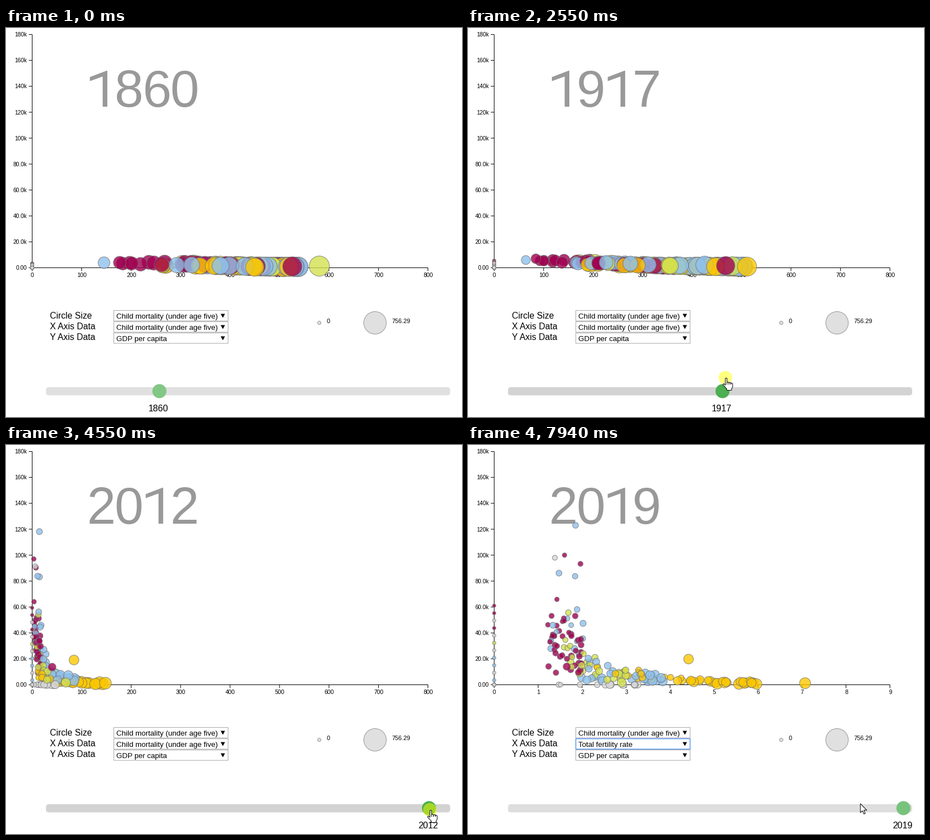
A matplotlib script that plays this animation: 810x692 px, repeating every 8 s.

```python
import numpy as np
import matplotlib.pyplot as plt
from matplotlib.animation import FuncAnimation
from matplotlib.colors import to_rgb, to_rgba
from matplotlib.patches import Circle, FancyBboxPatch, Polygon, Rectangle

W, H, DPI = 810, 692, 100
PT = 72 / DPI
STEP, FRAMES = 80, 100
X0, Y0 = 46.5, 426.5
X_LEN, Y_LEN = 703, 415
MAX_MORT = 756.29

MAROON, YELLOW, BLUE, LIME, GRAY = "#a00050", "#fdc800", "#8fc1ed", "#d3e14f", "#d8d8d8"

plt.rcParams["font.family"] = "Liberation Sans"
rng = np.random.default_rng(12)


def lerp(a, b, u):
    return a + (b - a) * u


def country(color, fert, start, end, mid, base, final, width=20, peak=0, peak_year=1980):
    """Mortality falls from start to end around mid; income (thousands) grows."""
    return color, (fert, start, end, mid, width, base, final, peak, peak_year)


def make_group(color, n, fert, skew, gdp, spread, start, end, mid, rich):
    """Incomes run from gdp[0] to gdp[1] as fertility rises; the rest follows wealth."""
    u = rng.random(n) ** skew
    final = lerp(*np.log(gdp), u) + rng.normal(0, spread, n)
    order = u - .6 * final + rng.normal(0, .3, n)
    q = np.argsort(np.argsort(order)) / (n - 1)

    def by_rank(limits, power=1):
        return lerp(*limits, np.clip(q + rng.normal(0, .05, n), 0, 1) ** power)

    base = .7 + rich * (1 - q) ** 1.5 * rng.uniform(.6, 1.1, n)
    final = np.exp(final)
    rows = zip(lerp(*fert, u), by_rank(start, .6), by_rank(end), by_rank(mid),
               np.minimum(base, .8 * final), final)
    return [country(color, *row) for row in rows]


countries = (
    make_group(MAROON, 42, (1.22, 2.02), 1, (27, 27), .55, (195, 510), (2, 9), (1913, 1935), 4)
    + make_group(BLUE, 40, (1.25, 3.9), 1.2, (45, 3), .55, (275, 540), (2, 40), (1925, 1968), 2)
    + make_group(LIME, 28, (1.55, 3.0), 1, (26, 6), .45, (310, 500), (4, 25), (1920, 1950), 3)
    + make_group(YELLOW, 44, (2.2, 6.0), .7, (16, 1.2), .45, (270, 510), (6, 42), (1933, 1986), 1)
    + make_group(GRAY, 11, (1.4, 3.6), 1.2, (.05, .05), 0, (60, 400), (2, 15), (1945, 1965), 0)
)

# Places without mortality data stay on the vertical axis.
no_data = [MAROON, MAROON, GRAY, MAROON, GRAY, LIME, GRAY, BLUE, BLUE, GRAY, BLUE]
countries += [country(c, 0, 0, 0, 1930, .5 + g / 22, g)
              for c, g in zip(no_data, np.linspace(61, 3.5, len(no_data)))]
countries += [country(GRAY, 0, 0, 0, 1930, .05, .05) for _ in range(6)]
countries = [countries[i] for i in rng.permutation(len(countries))]

# Countries that stand apart from their group.
countries += [
    country(BLUE, 1.85, 390, 7, 1934, 1.5, 123, peak=100, peak_year=1968),
    country(BLUE, 1.84, 430, 8, 1962, 1, 83, width=10, peak=145),
    country(BLUE, 1.75, 158, 4, 1908, 3.9, 46),
    country(LIME, 2.9, 588, 50, 1945, 1.3, 1.7),
    country(YELLOW, 4.42, 450, 80, 1968, .4, 19.8, width=10),
    country(YELLOW, 7.07, 520, 50, 1988, .8, 1.2, width=18),
    country(MAROON, 1.6, 190, 2, 1912, 4, 100),
    country(MAROON, 1.65, 530, 9, 1957, 1, 14),
    country(GRAY, 1.38, 60, 3, 1955, .05, 98),
]
colors = [c[0] for c in countries]
is_gray = np.array([c == GRAY for c in colors])
fertility, start, end, mid, width, base, final, peak, peak_year = np.array(
    [c[1] for c in countries]).T


def stats(year):
    mort = end + (start - end) / (1 + np.exp((year - mid) / width))
    if year < 1950:
        mort = np.where(is_gray, 0, mort)
    s = ((year - 1860) / 159) ** 1.3
    growth = s * s * (3 - 2 * s)
    boom = peak * np.exp(-((year - peak_year) / 17) ** 2)
    return mort, base * (final / base) ** growth + boom


fig = plt.figure(figsize=(W / DPI, H / DPI), dpi=DPI, facecolor="white")
ax = fig.add_axes([0, 0, 1, 1])
ax.set(xlim=(0, W), ylim=(H, 0))
ax.axis("off")


def put(x, y, s, size, **kw):
    kw = {"color": "black", "va": "baseline", **kw}
    return ax.text(x, y, s, fontsize=size * PT, **kw)


def line(xs, ys, **kw):
    return ax.plot(xs, ys, **{"color": "black", "lw": PT, "zorder": 2, "snap": False,
                              "solid_capstyle": "butt", **kw})[0]


def box(x, y, w, h, **kw):
    return ax.add_patch(Rectangle((x, y), w, h, snap=False, **kw))


# Large year; the figure one is a plain stem with a flag.
ONE = np.array([(11.5, 76), (11.5, 140), (3.2, 140), (3.2, 86.3), (-19.5, 94.5),
                (-19.5, 87.3), (10, 76)])
digits, ones = [], []
for i in range(4):
    cx = 168.5 + 49.6 * i
    digits.append(put(cx, 140, "", 92, color="#999999", ha="center", zorder=1))
    ones.append(ax.add_patch(Polygon(ONE + (cx, 0), fc="#999999", lw=0, zorder=1)))

# Axes
line([X0, X0], [Y0, Y0 - Y_LEN])
line([X0, X0 + X_LEN], [Y0, Y0])
for v in range(0, 181, 20):
    y = Y0 - v / 180 * Y_LEN
    line([X0 - 6, X0], [y, y])
    label = "0.00" if v == 0 else f"{v}.0k" if v < 100 else f"{v}k"
    put(37.5, y + 3.7, label, 10.1, ha="right")
ticks = [line([0, 0], [Y0, Y0 + 6]) for _ in range(10)]
tick_labels = [put(0, 443, "", 10.3, ha="center", zorder=2) for _ in range(10)]

dots = ax.scatter(fertility, fertility, s=1, lw=PT, zorder=3,
                  facecolors=[to_rgba(c, .8) for c in colors],
                  edgecolors=[(.45, .45, .45, .8)])

# Size legend
for x, r, label, lx in ((556.5, 3, "0", 569.5), (655.5, 20, "756.29", 685)):
    ax.add_patch(Circle((x, 524.5), r, fc="#e0e0e0", ec="#999999", lw=PT))
    put(lx, 525, label, 10.8)

# Drop-down controls
OPTIONS = ["Child mortality (under age five)", "Total fertility rate", "GDP per capita",
           "Life expectancy", "Population"]
boxes, chosen = [], []
for i, (name, opt) in enumerate((("Circle Size", 0), ("X Axis Data", 0), ("Y Axis Data", 2))):
    top = 502.5 + 20 * i
    put(78, 517 + 19 * i, name, 15.6)
    boxes.append(box(191.5, top, 203, 18.5, fc="white", ec="#a9a9a9", lw=PT))
    chosen.append(put(196, top + 14, OPTIONS[opt], 13.2))
    arrow = np.array([(381.3, 6), (389, 6), (385.2, 13)]) + (0, top)
    ax.add_patch(Polygon(arrow, fc="black", lw=0, zorder=2))

LIST_TOP, ROW = 542, 18
frame_box = box(191.5, LIST_TOP, 203, ROW * 5 + .5, fc="white", ec="#a9a9a9", lw=PT, zorder=5)
hilite = box(192, LIST_TOP, 202, ROW, fc="#1e90ff", lw=0, zorder=6)
rows = [put(196, LIST_TOP + ROW * i + 13.5, s, 13.2, zorder=7) for i, s in enumerate(OPTIONS)]
menu = [frame_box, hilite] + rows

# Slider
track = ax.add_patch(FancyBboxPatch((76, 644), 708, 4.5, boxstyle="round,pad=5,rounding_size=5",
                                    lw=0))
knob = ax.add_patch(Circle((0, 646), 12.5, lw=0, zorder=2))
slider_label = put(0, 682, "", 16, ha="center")

# Pointer
ARROW = np.array([(0, 0), (0, 16), (3.7, 12.6), (6.3, 18.5), (8.6, 17.5), (6.2, 11.7),
                  (11.3, 11.7)])
HAND = np.array([(0, 1), (1.5, 0), (3, 1), (3, 8), (5, 7.2), (6.5, 8.8), (8, 8), (10, 9.6),
                 (11.5, 9), (13, 10.5), (13, 16), (11, 19.5), (11, 22), (2.5, 22), (2.5, 19.5),
                 (-4, 12.5), (-3.5, 10.5), (-1.8, 10.8), (0, 13)]) + (0, .5)
glow = ax.add_patch(Circle((0, 0), 12, fc="#ffff00", alpha=.5, lw=0, zorder=8))
pointer = ax.add_patch(Polygon(ARROW, fc="white", ec="black", lw=PT, zorder=9))
creases = [line([0, 0], [0, 0], zorder=10) for _ in range(3)]


def track_of(*points):
    columns = list(zip(*points))
    return lambda t: [np.interp(t, columns[0], c) for c in columns[1:]]


year_at = track_of((840, 1860), (1000, 1862), (1320, 1867), (1880, 1887), (2520, 1917),
                   (3160, 1953), (3560, 1980), (4040, 2000), (4400, 2010), (5000, 2019))
approach = track_of((150, 440, 690), (400, 345, 666), (680, 276, 645))
grip = track_of((840, 3.5, 645), (1320, 4, 644), (2520, 5, 622), (3160, 7, 625),
                (4040, 1.5, 649))
leave = track_of((5360, 775, 649), (6050, 370, 560), (6300, 330, 533), (6650, 330, 535),
                 (7250, 322, 568), (7520, 322, 569), (7960, 697, 638))
hover = track_of((600, .7), (800, 1), (5450, 1), (5700, .7), (7880, .7), (7980, .77))


def knob_x(year):
    return lerp(272.5, 773.5, (year - 1860) / 159)


def pointer_at(t, year):
    if t < 760:
        return approach(t)
    if t < 5360:
        dx, y = grip(t)
        return knob_x(year) + dx, y
    return leave(t)


def faded(color, opacity):
    return lerp(np.ones(3), np.array(to_rgb(color)), opacity)


def draw_axis(top, step):
    for i, (tick, text) in enumerate(zip(ticks, tick_labels)):
        x = X0 + i * step / top * X_LEN
        shown = i * step <= top
        tick.set_xdata([x, x])
        tick.set_visible(shown)
        text.set_x(x + .5)
        text.set_text(str(i * step) if shown else "")


def draw_pointer(t, x, y):
    hand = 620 < t < 5480
    pointer.set_xy((HAND if hand else ARROW) + (x, y))
    pointer.set_visible(t > 150)
    for i, crease in enumerate(creases):
        cx = x + 3 + 3.4 * i
        crease.set_data([cx, cx], [y + 8.5, y + 12.5])
        crease.set_visible(hand)
    glow.center = x, y
    glow.set_visible(800 < t < 5060)


def draw_menu(t, y):
    is_open = 6450 < t < 7480
    for part in menu:
        part.set_visible(is_open)
    row = max(0, int((y - LIST_TOP) // ROW))
    hilite.set_y(LIST_TOP + ROW * row)
    for i, text in enumerate(rows):
        text.set_color("white" if i == row else "black")
    focused = t > 6280
    boxes[1].set_edgecolor("#5b94f0" if focused else "#a9a9a9")
    boxes[1].set_linewidth(PT * (1.5 if focused else 1))
    boxes[1].set_zorder(1.5 if focused else 1)
    chosen[1].set_text(OPTIONS[1 if t > 7480 else 0])


def update(frame):
    t = frame * STEP + STEP / 2
    year = int(round(year_at(t)[0]))
    by_fertility = t > 7520

    for ch, digit, one in zip(str(year), digits, ones):
        digit.set_text("" if ch == "1" else ch)
        one.set_visible(ch == "1")

    top, step = (9, 1) if by_fertility else (800, 100)
    draw_axis(top, step)
    mort, gdp = stats(year)
    value = fertility if by_fertility else mort
    dots.set_offsets(np.column_stack([X0 + value / top * X_LEN, Y0 - gdp / 180 * Y_LEN]))
    radius = 3 + 17 * np.sqrt(mort / MAX_MORT)
    dots.set_sizes((2 * radius * PT) ** 2)

    opacity = hover(t)[0]
    track.set_facecolor(faded("#d3d3d3", opacity))
    knob.set_facecolor(faded("#4caf50", opacity))
    knob.center = knob_x(year), 646
    slider_label.set_text(str(year))
    slider_label.set_x(knob_x(year) - 2)

    x, y = pointer_at(t, year)
    draw_pointer(t, x, y)
    draw_menu(t, y)
    return []


anim = FuncAnimation(fig, update, frames=FRAMES, interval=STEP, repeat=True, repeat_delay=0)
plt.show()
```
